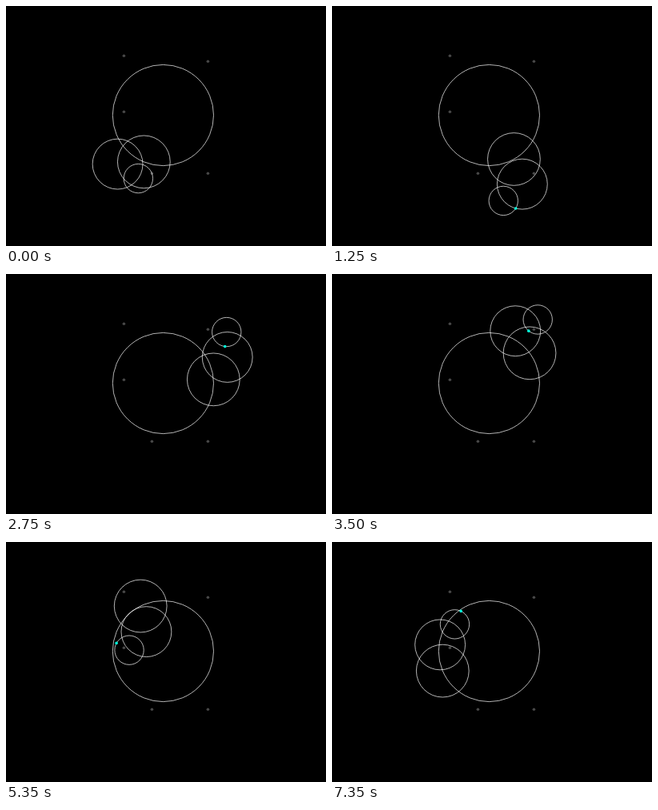
An HTML page with a canvas for the animation above (7.4 s loop, 400 px wide and 300 px high).

```html
<!DOCTYPE html>
<html lang="en">
<head>
<meta charset="utf-8">
<title>Epicycles</title>
<style>
  html, body { margin: 0; width: 100%; height: 100%; overflow: hidden; background: #000; }
  canvas { display: block; }
</style>
</head>
<body>
<canvas id="stage" width="400" height="300"></canvas>
<script>
const ctx = document.getElementById('stage').getContext('2d');
const TAU = 2 * Math.PI;
const LOOP = 7400, STEP = 50;
const SCALE = 0.7;
const points = [[260, 300], [360, 300], [360, 100], [210, 190], [210, 90]];

// Fourier coefficient of the points for one frequency
function coefficient(freq) {
  let re = 0, im = 0;
  points.forEach(([x, y], i) => {
    const a = -TAU * freq * i / points.length;
    re += x * Math.cos(a) - y * Math.sin(a);
    im += x * Math.sin(a) + y * Math.cos(a);
  });
  re /= points.length;
  im /= points.length;
  return { freq, re, im, radius: Math.hypot(re, im), phase: Math.atan2(im, re) };
}

const center = coefficient(0);
const wheels = [-1, -2, 2, 1].map(coefficient);

function dot(x, y, color) {
  ctx.fillStyle = color;
  ctx.beginPath();
  ctx.arc(x, y, 2.6, 0, TAU);
  ctx.fill();
}

function draw(time) {
  const tick = Math.floor(time % LOOP / STEP);
  const theta = TAU * 3 * Math.max(0, tick - 1) / 500;

  ctx.resetTransform();
  ctx.fillStyle = '#000';
  ctx.fillRect(0, 0, 400, 300);
  ctx.setTransform(SCALE, 0, 0, SCALE, 0.4, -0.7);
  points.forEach(([x, y]) => dot(x, y, '#484848'));

  let x = center.re, y = center.im;
  ctx.strokeStyle = '#fff';
  ctx.lineWidth = 1;
  for (const { freq, radius, phase } of wheels) {
    ctx.beginPath();
    ctx.arc(x, y, radius, 0, TAU);
    ctx.stroke();
    x += radius * Math.cos(freq * theta + phase);
    y += radius * Math.sin(freq * theta + phase);
  }
  // The pen is hidden on the very first tick
  if (tick > 0) dot(x, y, '#0fd');
}

const start = performance.now();
function loop() {
  draw(performance.now() - start);
  requestAnimationFrame(loop);
}
loop();
</script>
</body>
</html>
```
